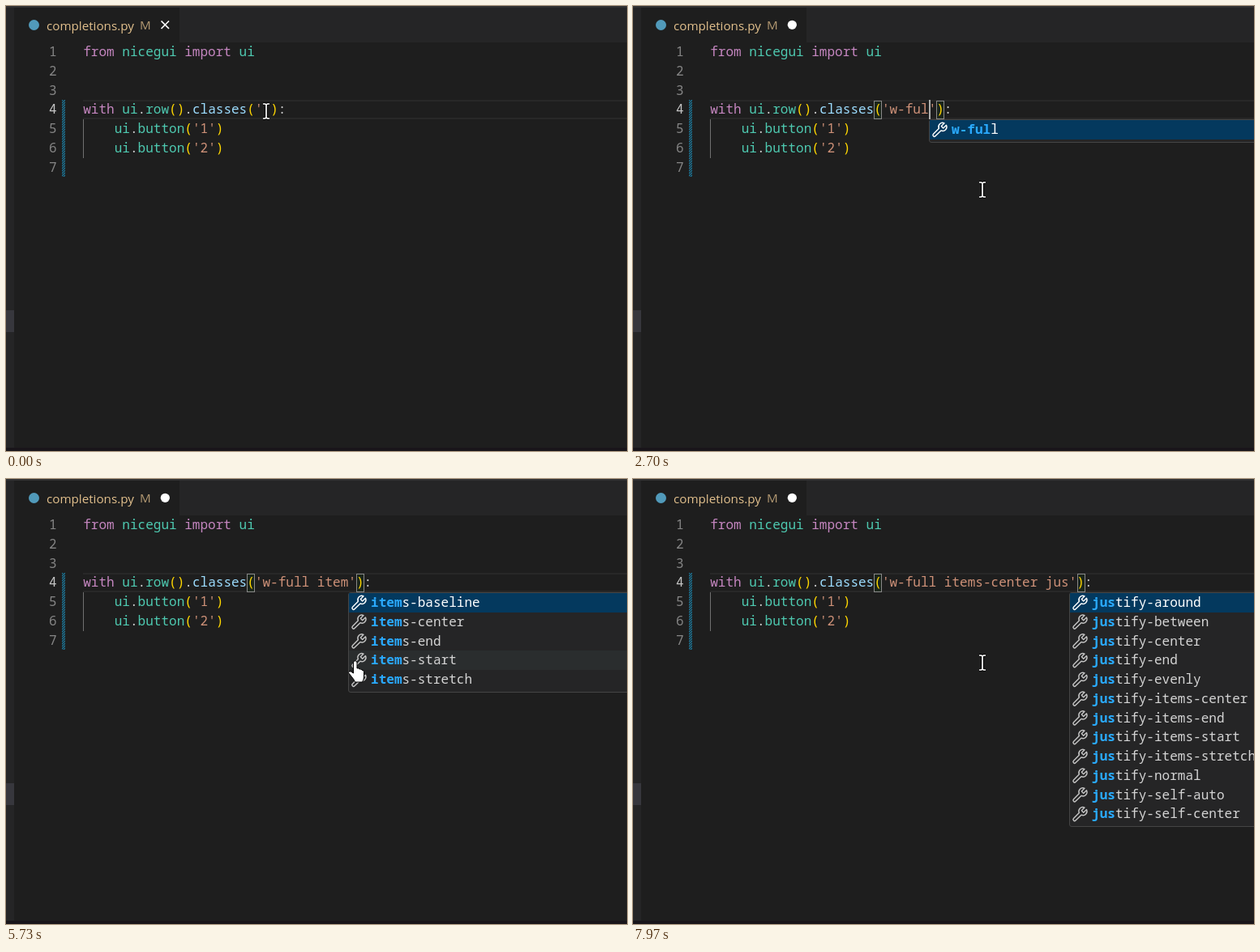
Write an HTML page that moves like this. It is 766x550 px and loops after 8000 ms.

```html
<!DOCTYPE html>
<html lang="en">
<head>
<meta charset="utf-8">
<title>Class completions</title>
<style>
  html, body { margin: 0; width: 100%; height: 100%; overflow: hidden; background: #1e1e1e; }
  svg { display: block; }
  text { font: 16.04px "Noto Sans Mono", monospace; white-space: pre; fill: #d4d4d4; }
  .tab { font: 15.2px "Open Sans", sans-serif; fill: #e2c08d; }
  .num { fill: #858585; }
  .now { fill: #c6c6c6; }
  .key { fill: #c586c0; }
  .cls { fill: #4ec9b0; }
  .prop { fill: #9cdcfe; }
  .str { fill: #ce9178; }
  .par { fill: #ffd700; }
  .hit { fill: #2aaaff; font-weight: bold; }
  .sel { fill: #fff; }
  .wrench { fill: none; stroke: #c5c5c5; stroke-width: 1.1; stroke-linejoin: round; }
  .wrench.on { stroke: #fff; }
  .pair { fill: rgba(0, 100, 0, .1); stroke: #888; }
</style>
</head>
<body>
<svg width="766" height="550" viewBox="0 0 766 550">
  <defs>
    <pattern id="hatch" width="3" height="3" patternUnits="userSpaceOnUse">
      <path d="M-1 1L1-1M0 3L3 0M2 4L4 2" stroke="#1b81a8" stroke-width="1.2"/>
    </pattern>
    <path id="wrench" d="M12.3 1.8A3.8 3.8 0 0 0 7.2 6.8L1.9 12.2a1.3 1.3 0 0 0 1.9 1.9L9.2 8.8A3.8 3.8 0 0 0 14.2 3.7L11.3 6.5 9.5 4.7Z"/>
  </defs>
  <rect width="766" height="550" fill="#1e1e1e"/>
  <path d="M0 0H10V546H0ZM214 0H766V45H214Z" fill="#252526"/>
  <path d="M0 376H10V403H0Z" fill="#37373d"/>
  <path d="M0 0H766V2H0Z" fill="#323233"/>
  <path d="M0 546H766V550H0Z" fill="#19151a"/>

  <circle cx="34.5" cy="23.5" r="6.5" fill="#519aba"/>
  <text class="tab" x="50" y="30">completions.py</text>
  <text class="tab" x="165" y="29" opacity=".75">M</text>
  <path id="close" d="M191.5 18.5L201 28M201 18.5L191.5 28" stroke="#fff" stroke-width="1.7"/>
  <circle id="dirty" cx="196.3" cy="23.3" r="5.6" fill="#fff"/>

  <path d="M95 117H766M95 139H766" stroke="#282828" stroke-width="2"/>
  <path d="M69 116H73V211H69Z" fill="url(#hatch)"/>
  <path d="M95.5 140V188" stroke="#707070"/>
  <g id="code"></g>
  <g id="live"></g>
  <g id="popup"></g>
  <g id="beam" fill="none">
    <path id="bar" d="M-4-9H-1.5L0-8 1.5-9H4M0-8V8M-4 9H-1.5L0 8 1.5 9H4" stroke="#000" stroke-width="3.4"/>
    <path d="M-4-9H-1.5L0-8 1.5-9H4M0-8V8M-4 9H-1.5L0 8 1.5 9H4" stroke="#fff" stroke-width="1.7"/>
  </g>
  <path id="hand" transform="translate(431.5 226)" fill="#fff" stroke="#000"
    d="M-3 14V1a2.2 2.2 0 0 1 4.5 0V8q2.6-1 3 1 2.6-.6 3 1.2 2.5-.3 2.5 2.3V18q0 4-2 7H-1q-1-3-4-6.500l-4-5q0-2.500 3-1.500z"/>
</svg>
<script>
const $ = id => document.getElementById(id);
const LOOP = 8000, X0 = 95.2, CH = 9.625, LH = 23.75;
const colX = col => X0 + col * CH;
const lineY = n => Math.round(45 + n * LH + 17);
const span = (cls, s) => `<tspan class="${cls}">${s}</tspan>`;
const label = (x, y, body, cls = '') => `<text x="${x}" y="${y}" class="${cls}">${body}</text>`;

const list = (prefix, ends) => ends.split(' ').map(e => prefix + e);
const widths = list('w-', '0 0.5 1 1.5 1/12 1/2 1/3 1/4 1/5 1/6 10 10/12');
const indents = list('indent-', '0 0.5 1 1.5 10 11 12 14 16 2 2.5 20');
const items = list('items-', 'baseline center end start stretch');
const justify = list('justify-', 'around between center end evenly items-center items-end ' +
  'items-start items-stretch normal self-auto self-center');
const options = {
  'w': widths, 'w-': widths, 'w-f': ['w-fit', 'w-full'], 'w-fu': ['w-full'], 'w-ful': ['w-full'],
  'i': indents, 'it': ['italic', ...items, ...indents.slice(0, 6)],
  'ite': [...items, ...indents.slice(0, 7)], 'item': items,
  'j': justify, 'ju': justify, 'jus': justify
};

// time, typed text, caret visible, popup query, selected row
const full = 'w-full ', both = 'w-full items-center';
const states = [
  [0, '', 0], [400, '', 1], [900, '', 0], [1370, '', 1],
  [1900, 'w', 1], [1970, 'w', 1, 'w'], [2170, 'w-', 1, 'w-'],
  [2400, 'w-f', 1, 'w-'], [2430, 'w-f', 1, 'w-f'], [2500, 'w-fu', 1, 'w-fu'],
  [2700, 'w-ful', 1, 'w-ful'], [3170, 'w-full', 1], [3670, 'w-full', 0],
  [3730, full, 1], [4230, full, 0], [4370, full + 'i', 1], [4400, full + 'i', 1, 'i'],
  [4830, full + 'it', 1, 'it'], [5070, full + 'ite', 1, 'ite'], [5230, full + 'item', 1, 'item'],
  [5730, full + 'item', 0, 'item'], [5900, full + 'item', 0, 'item', 1],
  [6230, full + 'item', 0], [6300, both, 1], [6800, both, 0], [7030, both + ' ', 1],
  [7170, both + ' j', 1], [7200, both + ' j', 1, 'j'], [7330, both + ' ju', 1, 'ju'],
  [7470, both + ' jus', 1, 'jus'], [7970, both + ' jus', 0, 'jus']
];

function drawCode() {
  const button = n => span('cls', 'ui') + '.' + span('cls', 'button') + span('par', '(') +
    span('str', `'${n}'`) + span('par', ')');
  let out = label(X0, lineY(0), span('key', 'from ') + span('cls', 'nicegui ') +
    span('key', 'import ') + span('cls', 'ui'));
  for (const n of [1, 2]) out += label(colX(4), lineY(n + 3), button(n));
  for (let n = 0; n < 7; n++) out += label(53, lineY(n), n + 1, n === 3 ? 'now' : 'num');
  $('code').innerHTML = out;
}

function drawLine(text, caret, active) {
  const end = 23 + text.length;
  const pair = col => `<rect class="pair" x="${Math.round(colX(col)) + .5}" y="117.5" width="9" height="22"/>`;
  let out = active ? pair(21) + pair(end + 1) : '';
  out += label(X0, lineY(3), span('key', 'with ') + span('cls', 'ui') + '.' + span('cls', 'row') +
    span('par', '()') + '.' + span('prop', 'classes') + span('par', '(') +
    span('str', `'${text}'`) + span('par', ')') + ':');
  if (caret) out += `<rect x="${Math.round(colX(end))}" y="116" width="2" height="24" fill="#aeafad"/>`;
  $('live').innerHTML = out;
}

// Marks the query letters in order, merging neighbours
function highlight(word, query) {
  let k = 0;
  return [...word].map(c => c === query[k] ? (k++, span('hit', c)) : c).join('');
}

function drawPopup(text, query, sel, hover) {
  if (!query) return $('popup').innerHTML = '';
  const rows = options[query];
  const x = Math.round(colX(23 + text.lastIndexOf(' ') + 1 + query.length));
  let out = `<rect x="${x + .5}" y="140.5" width="500" height="${Math.round(rows.length * LH + 4)}" rx="2.5" fill="#252526" stroke="#454545"/>`;
  rows.forEach((word, i) => {
    const y = 141 + i * LH, on = i === sel;
    const fill = on ? '#04395e' : i === 3 && hover ? '#2a2d2e' : '';
    if (fill) out += `<rect x="${x + 1}" y="${Math.round(y)}" width="500" height="24" fill="${fill}"/>`;
    out += `<use href="#wrench" class="wrench ${on ? 'on' : ''}" transform="translate(${x + 3} ${y + 1.5}) scale(1.3)"/>`;
    out += label(x + 28, Math.round(y + 17), highlight(word, query), on ? 'sel' : '');
  });
  $('popup').innerHTML = out;
}

const show = (id, on) => $(id).style.display = on ? '' : 'none';
const within = (t, a, b) => t >= a && t < b;
let shown;

function frame(now) {
  const t = now % LOOP;
  const state = states.findLast(s => s[0] <= t);
  const hand = within(t, 1970, 2430) || within(t, 4400, 6300);
  if (state !== shown) {
    shown = state;
    const [start, text, caret, query, sel = 0] = state;
    drawLine(text, caret, start >= 400);
    drawPopup(text, query, sel, hand);
    show('close', start < 1900);
    show('dirty', start >= 1900);
  }
  const p = Math.min(1, Math.max(0, (t - 400) / 470));
  const e = p * p * (3 - 2 * p);
  $('beam').setAttribute('transform', `translate(${321 + 110 * e} ${130 + 97 * e})`);
  show('beam', !hand);
  show('hand', hand);
  requestAnimationFrame(() => frame(performance.now()));
}

drawCode();
frame(performance.now());
</script>
</body>
</html>
```
